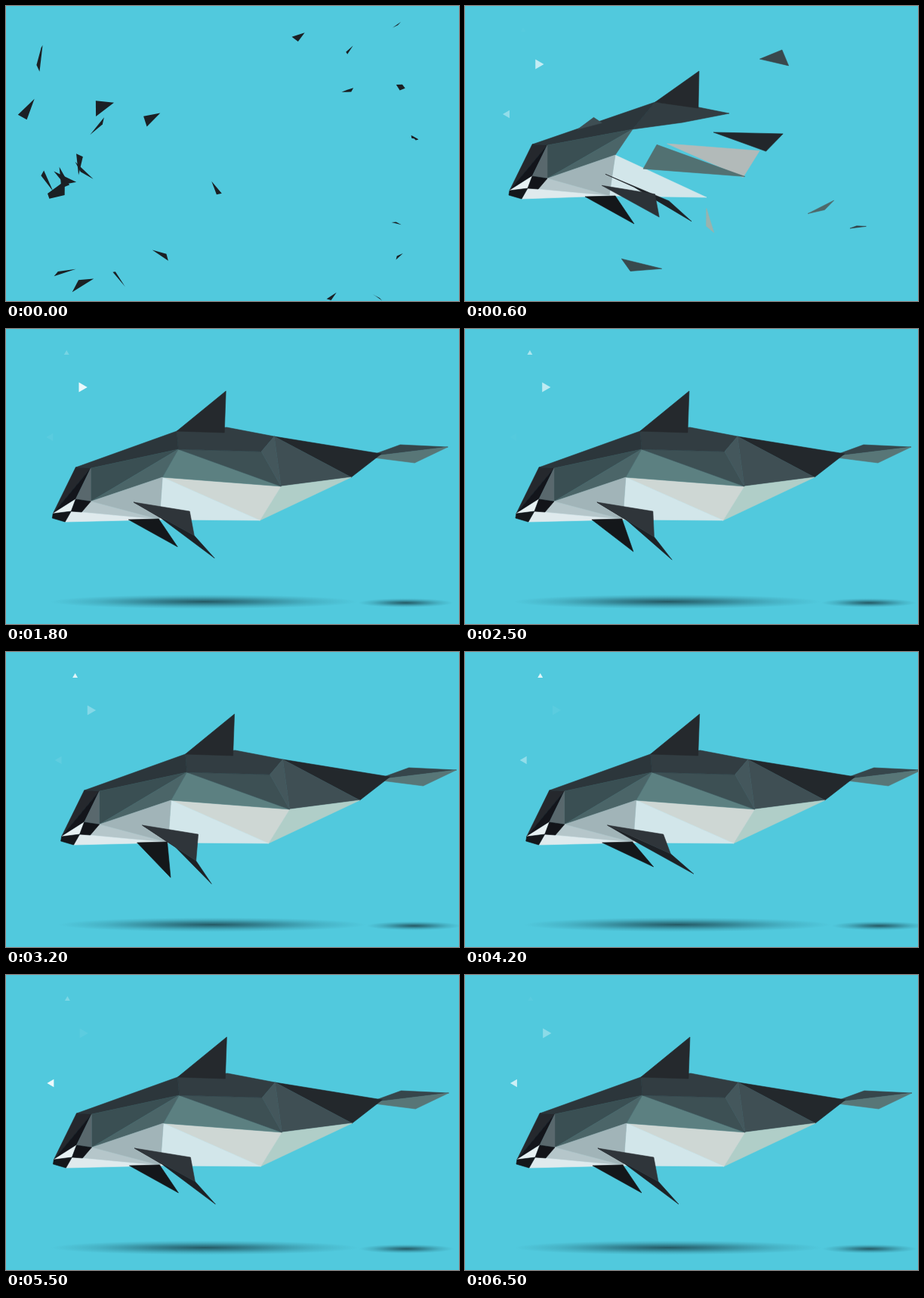
An HTML page with a canvas for the animation above (6.6 s loop, 600 by 390 pixels).

```html
<!DOCTYPE html>
<html lang="en">
<head>
<meta charset="utf-8">
<title>Porpoise in pieces</title>
<style>
html, body { margin: 0; width: 100%; height: 100%; overflow: hidden; background: #51c9dd; }
canvas { display: block; }
</style>
</head>
<body>
<canvas id="stage" width="600" height="390"></canvas>
<script>
const ctx = document.getElementById('stage').getContext('2d');
const LOOP = 6600, STEP = 100, JOIN = 600, SETTLE = 450;
const SEA = '#51c9dd', DARK = '#1b2024';

// Corners of the body: x, y and, where it stretches while joining, a first x, y
const V = {
  brow: [92, 183], crown: [112, 184], lip: [62, 244], jaw: [61, 250], chin: [78, 255],
  eye: [92, 225], cheek: [112, 228], mouth: [86, 241], pit: [100, 242],
  finFront: [226, 135, 255, 127], finTip: [291, 82, 313, 86], finBack: [289, 137, 312, 135],
  ridge: [292, 130, 303, 132], hump: [355, 142, 353, 142], flank: [338, 162, 291, 154],
  side: [228, 159, 225, 163], chest: [207, 196, 202, 197], waist: [364, 208],
  belly: [336, 253, 323, 253], throat: [203, 252, 194, 251],
  stock: [497, 165], heel: [457, 196],
  notch: [478, 169], flukeTop: [522, 153], flukeTip: [585, 156], flukeLow: [541, 177],
  farA: [162, 252], farB: [202, 251], farTip: [227, 288],
  nearA: [169, 229], nearB: [243, 241], nearC: [249, 273], nearTip: [276, 303], nearD: [205, 250]
};

const clamp = x => Math.max(0, Math.min(1, x));
const smooth = x => (x = clamp(x), x * x * (3 - 2 * x));
const lerp = (a, b, k) => a + (b - a) * k;
const random = n => { const x = Math.sin(n * 12.9898) * 43758.5453; return x - Math.floor(x); };

const pieces = [];
// from: first centre; loose: centre, scale and turn of a piece that joins late
function piece(color, corners, from, loose) {
  pieces.push({ color, corners: corners.split(' '), from, loose, spin: 360 * random(pieces.length + 1) - 180 });
}

piece('#36464b', 'notch flukeTop flukeTip', [518, 25], [520, 292, .2, 0]);
piece('#587677', 'notch flukeTip flukeLow', [517, 287], [473, 267, .36, -20]);
piece('#23282c', 'hump stock heel', [542, 175], [383, 176, .64, -8]);
piece('#3f4f54', 'hump heel waist', [387, 41], [413, 69, .34, 165]);
piece('#b0cec8', 'waist heel belly', [520, 331], [323, 286, .25, 278]);
piece('#ced7d4', 'chest waist belly', [279, 243], [342, 200, .78, 0]);
piece('#d2e6ea', 'chest belly throat', [76, 230]);
piece('#5c8081', 'side waist chest', [454, 59], [287, 208, .86, 0]);
piece('#3d5054', 'side flank waist', [207, 329], [229, 344, .38, 174]);
piece('#323d42', 'finFront ridge hump flank side', [453, 112]);
piece('#2c363b', 'brow finFront side crown', [45, 68]);
piece('#44575c', 'hump flank waist', [431, 385], [167, 155, .5, 83]);
piece('#25292d', 'finFront finTip finBack', [127, 133]);
piece('#3a4f53', 'crown side cheek', [97, 206]);
piece('#4b6568', 'cheek side chest', [123, 158]);
piece('#a1b4b8', 'cheek chest throat', [191, 149]);
piece('#b5c6ca', 'mouth cheek throat', [75, 352]);
piece('#dfeaed', 'chin mouth throat', [148, 358]);
piece('#25282d', 'brow crown lip', [53, 229]);
piece('#13151b', 'crown eye lip', [102, 218]);
piece('#59686d', 'crown cheek eye', [27, 139]);
piece('#e6f0f2', 'lip eye mouth', [78, 229]);
piece('#14171b', 'lip mouth chin jaw', [67, 246]);
piece('#121419', 'eye cheek pit mouth', [523, 107]);
piece('#14171a', 'farA farB farTip', [100, 367]);
piece('#1d2125', 'nearA nearC nearTip nearD', [492, 385], [245, 251, 1, -6]);
piece('#2f353a', 'nearA nearB nearC', [540, 174], [230, 255, .95, 0]);

function track(keys, t, ease = x => x) {
  let i = 1;
  while (i < keys.length - 1 && t > keys[i][0]) i++;
  const [t0, a] = keys[i - 1], [t1, b] = keys[i];
  return lerp(a, b, ease(clamp((t - t0) / (t1 - t0))));
}

const drift = [[1400, -3], [4300, 20.5], [4850, 0], [5250, 0], [6600, 7.5]];
const paddle = [[1800, 0], [3200, 8], [4200, -7], [5000, 0]];
const bubbles = [
  { x: 100, y: 77, size: 7.5, angle: 0, peak: 1500 },
  { x: 59, y: 143, size: 6, angle: 180, peak: 5700 },
  { x: 80, y: 32, size: 4, angle: -90, peak: 3700 }
];

function mix(a, b, k) {
  const part = (c, i) => parseInt(c.slice(i, i + 2), 16);
  return `rgb(${[1, 3, 5].map(i => Math.round(lerp(part(a, i), part(b, i), k)))})`;
}

// Turns and scales p about c, then moves c to the place given
function pose([x, y], [cx, cy], [px, py], scale, degrees) {
  const a = degrees * Math.PI / 180, c = Math.cos(a) * scale, s = Math.sin(a) * scale;
  return [px + (x - cx) * c - (y - cy) * s, py + (x - cx) * s + (y - cy) * c];
}

function corner(name, t, dx, stretch) {
  const [x, y, x0 = x, y0 = y] = V[name];
  let p = [lerp(x, x0, stretch), lerp(y, y0, stretch)];
  const a = track(paddle, t, smooth), reach = 1 - Math.max(0, a) * .011;
  const farHip = [182, 251], nearHip = [200, 240];
  if (name === 'farTip') p = pose(p, farHip, farHip, reach, a * (a > 0 ? 2.9 : .7));
  if (name === 'nearC' || name === 'nearTip') p = pose(p, nearHip, nearHip, reach, a);
  return [p[0] + dx, p[1]];
}

function fillShape(points, color, seam) {
  ctx.beginPath();
  points.forEach(p => ctx.lineTo(p[0], p[1]));
  ctx.closePath();
  ctx.fillStyle = ctx.strokeStyle = color;
  ctx.fill();
  if (seam) { ctx.lineWidth = .6; ctx.lineJoin = 'bevel'; ctx.stroke(); }
}

function drawPiece(p, t, dx) {
  const settle = smooth((t - JOIN) / SETTLE);
  const home = p.corners.map(name => corner(name, t, dx, p.loose ? 0 : 1 - settle));
  const centre = [0, 1].map(i => home.reduce((sum, q) => sum + q[i], 0) / home.length);
  const radius = Math.max(...home.map(q => Math.hypot(q[0] - centre[0], q[1] - centre[1])));

  const first = [...p.from, (20 - p.from[0] / 40) / radius, p.spin];
  const last = [...centre, 1, 0];
  const mid = p.loose || last;
  const flight = smooth(t / JOIN);
  const [x, y, scale, turn] = t < JOIN
    ? first.map((v, i) => lerp(v, mid[i], flight))
    : mid.map((v, i) => lerp(v, last[i], settle));

  const tint = smooth(t / (p.loose ? 800 : JOIN));
  fillShape(home.map(q => pose(q, centre, [x, y], scale, turn)), mix(DARK, p.color, tint), t >= JOIN);
}

function shadow(x, y, rx, ry, alpha) {
  ctx.save();
  ctx.translate(x, y);
  ctx.scale(rx, ry);
  const g = ctx.createRadialGradient(0, 0, 0, 0, 0, 1);
  g.addColorStop(0, `rgba(20,45,52,${.72 * alpha})`);
  g.addColorStop(.35, `rgba(20,55,65,${.46 * alpha})`);
  g.addColorStop(.7, `rgba(25,75,88,${.18 * alpha})`);
  g.addColorStop(1, 'rgba(30,90,105,0)');
  ctx.fillStyle = g;
  ctx.fillRect(-1, -1, 2, 2);
  ctx.restore();
}

function drawBubble(b, t, dx) {
  const gap = Math.abs(t - b.peak), away = Math.min(gap, LOOP - gap) / 1600;
  const points = [0, 120, 240].map(a =>
    pose([b.size, 0], [0, 0], [b.x + dx, b.y], 1, a + b.angle));
  ctx.globalAlpha = smooth(t / JOIN) * Math.exp(-away * away);
  fillShape(points, '#effafc');
  ctx.globalAlpha = 1;
}

function draw(t) {
  const dx = track(drift, t);
  ctx.fillStyle = SEA;
  ctx.fillRect(0, 0, 600, 390);

  const shade = smooth((t - 700) / 700);
  shadow(262 + dx, 360.5, 204, 9.5, shade);
  shadow(529 + dx, 362, 63, 6, shade);
  pieces.forEach(p => drawPiece(p, t, dx));
  bubbles.forEach(b => drawBubble(b, t, dx));
}

const begin = performance.now();
function tick() {
  const t = (performance.now() - begin) % LOOP;
  draw(Math.floor(t / STEP) * STEP);
  requestAnimationFrame(tick);
}
tick();
</script>
</body>
</html>
```
